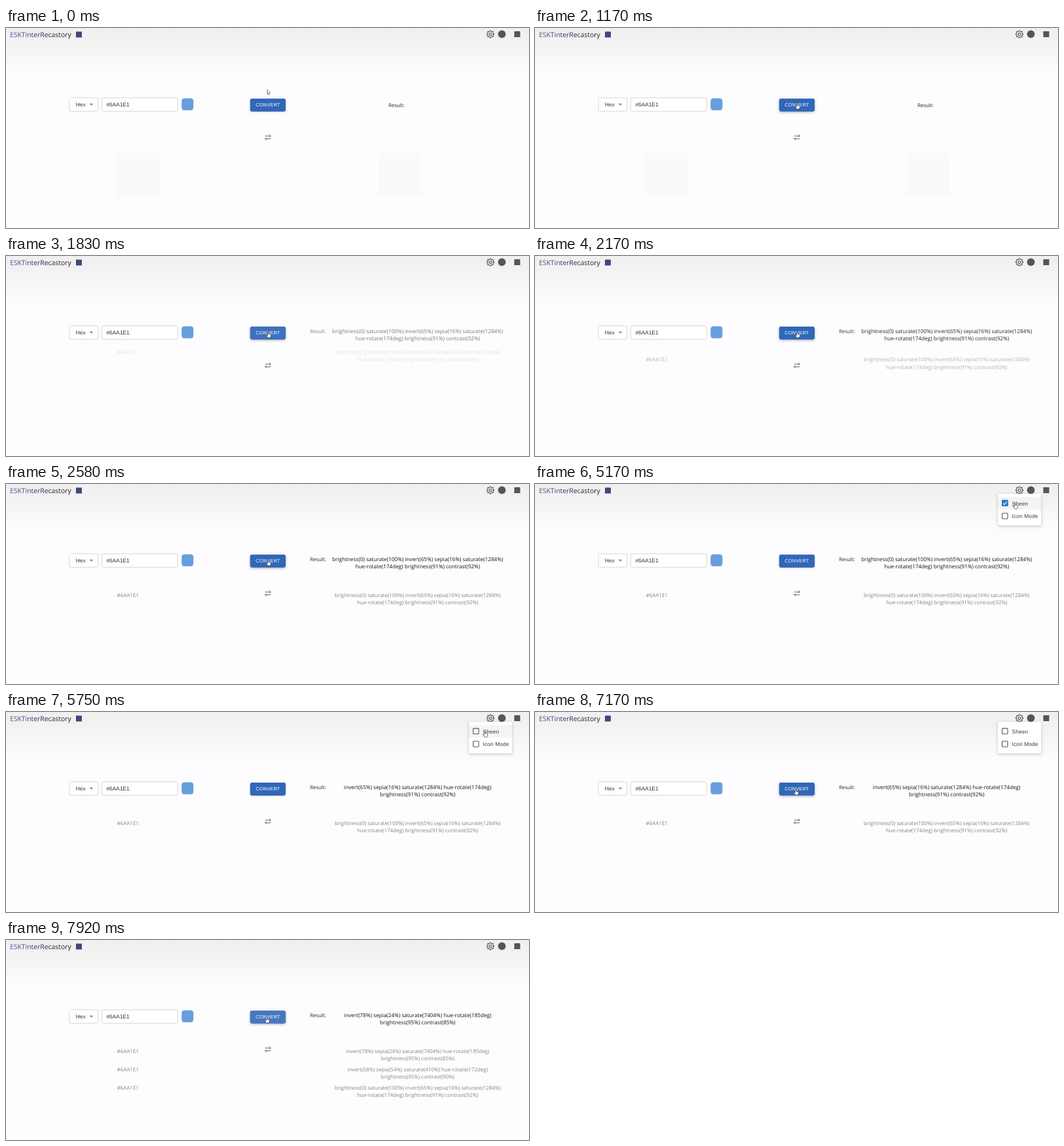
An HTML page with a canvas that plays this animation: 800x306 px, repeating every 8 s.

```html
<!DOCTYPE html>
<html lang="en">
<head>
<meta charset="utf-8">
<title>Colour converter</title>
<style>
  html, body { margin: 0; width: 100%; height: 100%; overflow: hidden; background: #fdfcfe; }
  canvas { display: block; width: 800px; height: 306px; }
</style>
</head>
<body>
<canvas id="stage"></canvas>
<script>
const W = 800, H = 306, LOOP = 8000, STEP = LOOP / 96;
const canvas = document.getElementById('stage');
const ctx = canvas.getContext('2d');
const dpr = window.devicePixelRatio || 1;
canvas.width = W * dpr;
canvas.height = H * dpr;

const SANS = '"Open Sans", "Noto Sans", sans-serif';
const UI = '"Liberation Sans", Arial, sans-serif';
const HEX = '#6AA1E1';

const FULL = ['brightness(0) saturate(100%) invert(65%) sepia(16%) saturate(1284%)',
  'hue-rotate(174deg) brightness(91%) contrast(92%)'];
const SHORT = ['invert(65%) sepia(16%) saturate(1284%) hue-rotate(174deg)',
  'brightness(91%) contrast(92%)'];
const SECOND = ['invert(58%) sepia(54%) saturate(410%) hue-rotate(172deg)',
  'brightness(95%) contrast(90%)'];
const THIRD = ['invert(78%) sepia(24%) saturate(7404%) hue-rotate(185deg)',
  'brightness(95%) contrast(85%)'];

const CLICKS = [1415, 7240, 7570];
const SHOWN = 1415, UNCHECK = 5240, CONVERT2 = 7320, CONVERT3 = 7650;
const LINE = 11.15, ROW = 28;

// Pointer tip: time, x, y
const PATH = [
  [580, 399.5, 94.5], [1250, 401, 116.5],
  [2640, 401, 116.5], [3180, 741, 11],
  [3330, 741, 11], [3700, 739, 17],
  [3900, 739, 17], [4330, 734, 29.5],
  [5720, 734, 29.5], [6500, 398.7, 118.5]
];

const clamp = v => Math.max(0, Math.min(1, v));
const ramp = (t, a, b) => clamp((t - a) / (b - a));
const smooth = u => u * u * (3 - 2 * u);
const pulse = (t, a, b, c, d) => ramp(t, a, b) * (1 - ramp(t, c, d));

function pointerAt(t) {
  let i = 0;
  while (i < PATH.length - 1 && PATH[i + 1][0] <= t) i++;
  const a = PATH[i], b = PATH[Math.min(i + 1, PATH.length - 1)];
  const u = a === b ? 0 : smooth(ramp(t, a[0], b[0]));
  return { x: a[1] + (b[1] - a[1]) * u, y: a[2] + (b[2] - a[2]) * u };
}

function text(str, x, y, size, color, o = {}) {
  ctx.font = `${size}px ${o.font || SANS}`;
  ctx.letterSpacing = `${o.gap || 0}px`;
  ctx.textAlign = o.align || 'left';
  ctx.fillStyle = color;
  ctx.fillText(str, x, y);
}

function box(x, y, w, h, r, fill, stroke, line = 1) {
  ctx.beginPath();
  ctx.roundRect(x, y, w, h, r);
  if (fill) { ctx.fillStyle = fill; ctx.fill(); }
  if (stroke) { ctx.strokeStyle = stroke; ctx.lineWidth = line; ctx.stroke(); }
}

function disc(x, y, r, fill) {
  ctx.beginPath();
  ctx.arc(x, y, r, 0, 7);
  ctx.fillStyle = fill;
  ctx.fill();
}

function poly(points, fill, stroke, line) {
  ctx.beginPath();
  points.forEach(p => ctx.lineTo(p[0], p[1]));
  ctx.closePath();
  if (fill) { ctx.fillStyle = fill; ctx.fill(); }
  if (stroke) { ctx.strokeStyle = stroke; ctx.lineWidth = line; ctx.stroke(); }
}

function lines(points, color, width) {
  ctx.beginPath();
  points.forEach(p => ctx.lineTo(p[0], p[1]));
  ctx.strokeStyle = color;
  ctx.lineWidth = width;
  ctx.stroke();
}

function faded(alpha, draw) {
  if (alpha <= 0) return;
  ctx.save();
  ctx.globalAlpha = alpha;
  draw();
  ctx.restore();
}

function withShadow(dy, blur, alpha, draw) {
  ctx.save();
  ctx.shadowColor = `rgba(0,0,0,${alpha})`;
  ctx.shadowOffsetY = dy * dpr;
  ctx.shadowBlur = blur * dpr;
  draw();
  ctx.restore();
}

function backdrop() {
  const g = ctx.createLinearGradient(0, 0, 0, 76);
  g.addColorStop(0, '#efeff0');
  g.addColorStop(0.3, '#f3f3f4');
  g.addColorStop(0.7, '#f9f9fa');
  g.addColorStop(1, '#fdfcfe');
  ctx.fillStyle = g;
  ctx.fillRect(0, 0, W, H);
}

function gear(x, y, color) {
  ctx.save();
  ctx.translate(x, y);
  ctx.beginPath();
  for (let i = 0; i < 32; i++) {
    const a = (i - 0.5) / 32 * Math.PI * 2;
    const r = i % 4 < 2 ? 5.6 : 4.4;
    ctx.lineTo(Math.cos(a) * r, Math.sin(a) * r);
  }
  ctx.closePath();
  ctx.strokeStyle = color;
  ctx.lineWidth = 1.05;
  ctx.lineJoin = 'round';
  ctx.stroke();
  ctx.beginPath();
  ctx.arc(0, 0, 2, 0, 7);
  ctx.stroke();
  ctx.restore();
}

function header(t) {
  const ink = ctx.createLinearGradient(6, 0, 100, 0);
  ink.addColorStop(0, '#4a5c94');
  ink.addColorStop(0.5, '#2b3154');
  ink.addColorStop(1, '#15161c');
  text('ESKTinterRecastory', 6, 14, 10.4, ink);
  box(107, 5.5, 9, 9, 0, '#3d4a7c');
  const hot = pulse(t, 3080, 3200, 3920, 4080);
  const shade = Math.round(74 * (1 - hot));
  gear(741, 9.5, `rgb(${shade},${shade},${shade})`);
  disc(758.5, 9.3, 5.9, '#555');
  box(777.5, 5, 9, 9, 0, '#555');
}

function form() {
  box(96.9, 106.8, 43.8, 20.5, 2.2, '#fff', '#cfcfd2', 0.8);
  text('Hex', 106.7, 119.9, 8.4, '#333', { font: UI });
  poly([[127.9, 115.8], [133.2, 115.8], [130.55, 118.5]], '#707070');
  box(146.4, 106.8, 116.3, 20.5, 2.2, '#fff', '#cfcfd2', 0.8);
  text(HEX, 153.4, 119.9, 8.4, '#333', { font: UI });
  box(268.8, 107.8, 17.7, 17.9, 4, '#669ede', '#80ade1', 0.6);
}

function button(t) {
  const hover = Math.max(pulse(t, 900, 1160, 2670, 2920), ramp(t, 6420, 6700));
  const face = () => box(373.7, 108.2, 53.8, 19.2, 2.1, '#3067b9');
  withShadow(0.9 + hover * 0.6, 1.8 + hover * 1.8, 0.24, face);
  withShadow(0.5, 2.6 + hover * 2, 0.1, face);
  ctx.save();
  ctx.beginPath();
  ctx.roundRect(373.7, 108.2, 53.8, 19.2, 2.1);
  ctx.clip();
  CLICKS.forEach(c => {
    const dt = t - c;
    if (dt < 0 || dt > 520) return;
    disc(401, 117.5, 6 + 46 * smooth(ramp(dt, 0, 300)),
      `rgba(255,255,255,${0.12 * (1 - ramp(dt, 320, 520))})`);
  });
  ctx.restore();
  text('CONVERT', 382, 120.3, 7.35, '#fff', { font: UI, gap: 0.21 });
}

function swapIcon() {
  const c = '#5a5a5a';
  lines([[396.3, 165.2], [404.8, 165.2]], c, 0.9);
  lines([[402.7, 163], [405, 165.2], [402.7, 167.4]], c, 0.9);
  lines([[396.4, 169.6], [404.9, 169.6]], c, 0.9);
  lines([[398.5, 167.4], [396.2, 169.6], [398.5, 171.8]], c, 0.9);
}

function pair(rows, y, size, color) {
  rows.forEach((row, i) => text(row, 629.7, y + i * LINE, size, color, { align: 'center' }));
}

function result(t) {
  if (t < SHOWN) {
    text('Result:', 585, 120.7, 7.8, '#222');
    return;
  }
  const rows = t < UNCHECK ? FULL : t < CONVERT2 ? SHORT : t < CONVERT3 ? SECOND : THIRD;
  faded(0.12 + 0.88 * ramp(t, SHOWN, 2250), () => {
    text('Result:', 465, 118.2, 7.8, '#222');
    pair(rows, 118.3, 8.2, '#161616');
  });
}

function history(t) {
  const list = [FULL];
  if (t >= CONVERT2) list.unshift(SECOND);
  if (t >= CONVERT3) list.unshift(THIRD);
  // The first row slides down one row height as it fades in
  const shown = ramp(t, 1660, 2500);
  faded(shown, () => list.forEach((rows, i) => {
    const y = 172.5 + (i - 1 + shown) * ROW;
    text(HEX, 186.5, y, 7.96, '#858585', { align: 'center' });
    pair(rows, y, 7.96, '#858585');
  }));
}

function checkbox(y, label, on) {
  box(714.6, y - 4.4, 8.4, 8.4, 0.8, null, '#555', 1.1);
  faded(on, () => {
    box(714, y - 5, 9.6, 9.6, 1.1, '#1976d2');
    lines([[715.7, y - 0.1], [717.9, y + 2.1], [722, y - 2.3]], '#fff', 1.2);
  });
  text(label, 729.6, y + 3, 8.4, '#3c3c3c', { font: UI, gap: 0.08 });
}

function menu(t) {
  const open = pulse(t, 3310, 3580, 7170, 7320);
  faded(open, () => {
    const panel = () => box(708, 15, 66.3, 48.5, 2, '#fff');
    withShadow(1.2, 4.5, 0.2, panel);
    withShadow(0.6, 1.5, 0.14, panel);
    const hover = pulse(t, 4080, 4250, 5780, 5960);
    box(708, 19.7, 66.3, 19.6, 0, `rgba(0,0,0,${0.045 * hover})`);
    const dt = t - 5160;
    if (dt > 0 && dt < 500) {
      disc(718.8, 29.5, 3 + 7 * ramp(dt, 0, 250), `rgba(25,118,210,${0.18 * (1 - ramp(dt, 200, 420))})`);
    }
    checkbox(29.5, 'Sheen', 1 - ramp(t, 5160, 5320));
    checkbox(49.2, 'Icon Mode', 0);
  });
}

function pointer(t) {
  const { x, y } = pointerAt(t);
  const inside = (l, top, r, b) => x > l && x < r && y > top && y < b;
  const hand = inside(373, 108, 428, 128) || inside(735, 4, 747, 16) ||
    (t > 3310 && t < 7240 && inside(708, 20, 774, 60));
  ctx.save();
  ctx.translate(x, y);
  ctx.lineJoin = 'round';
  if (hand) {
    poly([[-0.7, 0.3], [0, -0.2], [0.8, 0.3], [0.9, 2.8], [3.2, 3.2], [4.2, 4.1],
      [4.1, 6.3], [3.2, 8.4], [-0.5, 8.4], [-2.9, 5], [-2.4, 4.2], [-0.7, 5.4]],
      '#fff', '#3a3a3a', 0.7);
  } else {
    poly([[0, 0], [0, 6.6], [1.5, 5.3], [2.6, 7.8], [3.6, 7.3], [2.6, 4.9], [4.6, 4.8]],
      '#fff', '#4a4a4a', 0.7);
  }
  ctx.restore();
}

function render(t) {
  ctx.setTransform(dpr, 0, 0, dpr, 0, 0);
  ctx.textRendering = 'geometricPrecision';
  backdrop();
  header(t);
  faded(1 - ramp(t, 1330, 1500), () => {
    box(169, 192, 66, 66, 0, '#faf9fb');
    box(569, 192, 66, 66, 0, '#faf9fb');
  });
  form();
  button(t);
  swapIcon();
  result(t);
  history(t);
  menu(t);
  pointer(t);
}

const start = performance.now();
function tick() {
  const t = (performance.now() - start) % LOOP;
  // The picture advances twelve times a second
  render(Math.floor((t + 4) / STEP) * STEP % LOOP);
  requestAnimationFrame(tick);
}
tick();
</script>
</body>
</html>
```
